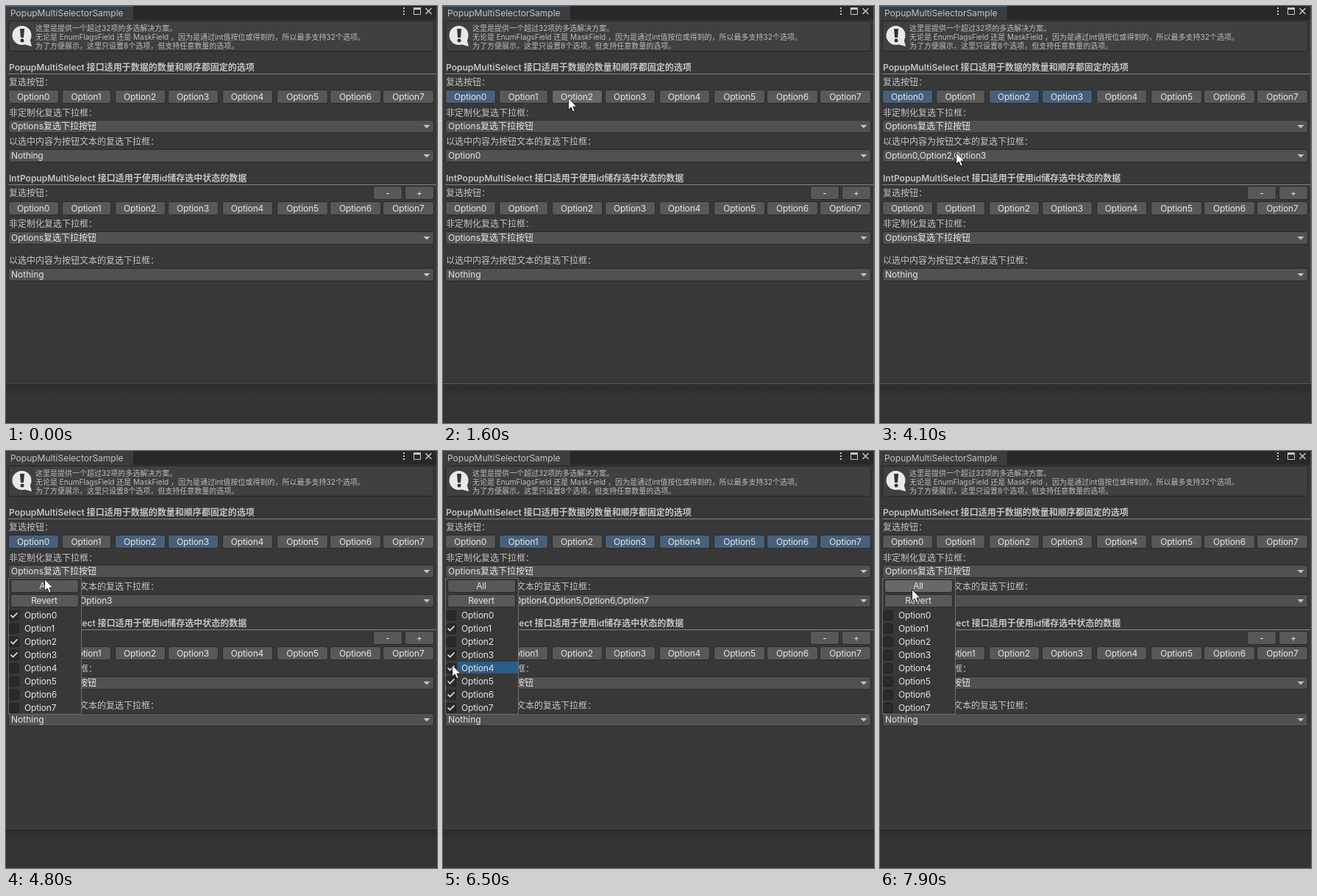
Write an HTML page that moves like this. It is 586x568 px and loops after 8 s.

```html
<!DOCTYPE html>
<html lang="zh-CN">
<head>
<meta charset="utf-8">
<title>PopupMultiSelectorSample</title>
<style>
html, body { margin: 0; width: 100%; height: 100%; overflow: hidden; background: #343434; }
svg { display: block; width: 586px; height: 568px; }
text { font: 12px Inter, "Noto Sans CJK SC", "Noto Sans CJK", sans-serif; fill: #c4c4c4; white-space: pre; }
.bold { font-weight: 600; }
.small { font-size: 10px; fill: #bdbdbd; }
.light { fill: #e6e6e6; }
.opt { fill: #e6e6e6; letter-spacing: -.15px; }
.mid { text-anchor: middle; }
</style>
</head>
<body>
<svg viewBox="0 0 586 568">
  <defs>
    <linearGradient id="shade" x2="0" y2="1">
      <stop offset="0" stop-color="#2c2c2c"/><stop offset="1" stop-color="#343434"/>
    </linearGradient>
  </defs>
  <g id="base"></g>
  <g id="live"></g>
</svg>
<script>
const LOOP = 8000, STEP = 100, FOCUS = 1000, OPEN = 4700, ALL = 255;

// Key points of the pointer: time, x, y
const PATH = [
  [100, 561, 47], [900, 33, 121], [1600, 170, 125], [2200, 261, 124], [2600, 217, 131],
  [3000, 33, 194], [3600, 137, 226], [4100, 103, 199], [4500, 53, 165], [4700, 53, 165],
  [5100, 47, 201], [5400, 47, 201], [5900, 14, 275], [6500, 12, 291], [6900, 12, 288], [7400, 43, 188]
];
// Each click acts on whatever lies under the pointer
const CLICKS = [1000, 1800, 2200, 5300, 6200, 6600, 6900, 7900];

const items = [...Array(8).keys()];
const colX = i => 3 + 72 * i + (i > 0) + 2 * (i > 3) + 2 * (i > 4);
const colW = i => 69 + (i > 4) - 2 * (i === 1);
const rowY = i => 224 + 18 * i;
const optionName = i => 'Option' + i;

const $ = id => document.getElementById(id);
const rect = (x, y, w, h, fill, more = '') => `<rect x="${x}" y="${y}" width="${w}" height="${h}" fill="${fill}" ${more}/>`;
const text = (x, cy, s, cls = '') => `<text x="${x}" y="${cy + 4.4}" class="${cls}">${s}</text>`;
const box = (x, y, w, h, fill, edge = '#2a2a2a', r = 3) =>
  rect(x + .5, y + .5, w - 1, h - 1, fill, `stroke="${edge}" rx="${r}"`);
const button = (x, y, w, s, fill = '#585858', h = 19) =>
  box(x, y, w, h, fill) + text(x + Math.floor(w / 2), y + h / 2, s, 'opt mid');
const dropdown = (cy, s) =>
  box(3, cy - 9, 579, 18, '#515151') + (s ? text(7, cy, s, 'light') : '') +
  `<path d="M567.5 ${cy - 2}h9l-4.5 4.5z" fill="#c4c4c4"/>`;

function drawBase() {
  const help = ['这里是提供一个超过32项的多选解决方案。',
    '无论是 EnumFlagsField 还是 MaskField ，因为是通过int值按位或得到的，所以最多支持32个选项。',
    '为了方便展示，这里只设置8个选项，但支持任意数量的选项。'];
  const section = (cy, title) => text(4, cy, title, 'bold') + rect(3, cy + 8, 582, 1, '#848484');
  const labels = y => text(4, y, '复选按钮：') + text(4, y + 41.5, '非定制化复选下拉框：');
  $('base').innerHTML =
    rect(0, 0, 586, 568, '#343434') + rect(0, 515, 586, 16, 'url(#shade)') +
    rect(0, 0, 586, 515, '#383838') + rect(0, 0, 586, 19, '#282828') +
    rect(0, 0, 173, 19, '#3c3c3c') + rect(173, 0, 1, 19, '#232323') +
    text(6, 10, 'PopupMultiSelectorSample') +
    [2, 6, 10].map(y => rect(540, y, 2, 2, '#c8c8c8')).join('') +
    '<path d="M554.5 3v8.5h9V3" fill="none" stroke="#c8c8c8"/>' + rect(554, 2, 10, 3, '#c8c8c8') +
    '<path d="M570.5 3l8 8m0-8l-8 8" stroke="#c8c8c8" stroke-width="1.5"/>' +
    box(3, 20, 579, 42, '#404040', '#252525') +
    '<g fill="#e9e9e9"><circle cx="21.5" cy="40" r="13"/><path d="M24 52l11 3-3-11z"/></g>' +
    '<g fill="#333"><path d="M19 31h6l-1 12h-4z"/><circle cx="22" cy="47" r="2.5"/></g>' +
    help.map((s, i) => text(40, 29.2 + i * 12.2, s, 'small')).join('') +
    section(84, 'PopupMultiSelect 接口适用于数据的数量和顺序都固定的选项') +
    section(235, 'IntPopupMultiSelect 接口适用于使用id储存选中状态的数据') +
    labels(104) + labels(255) +
    [185, 347].map(y => text(4, y, '以选中内容为按钮文本的复选下拉框：')).join('') +
    dropdown(164, 'Options复选下拉按钮') + dropdown(204) +
    dropdown(316, 'Options复选下拉按钮') + dropdown(366, 'Nothing') +
    button(499, 245, 40, '-') + button(542, 245, 40, '+') +
    items.map(i => button(colX(i), 266, colW(i), optionName(i))).join('');
}

function pointerAt(t) {
  if (t < PATH[0][0]) return null;
  const k = PATH.findIndex(p => p[0] > t);
  if (k < 0) return PATH[PATH.length - 1].slice(1);
  const [t0, ...a] = PATH[k - 1], [t1, ...b] = PATH[k];
  return a.map((v, j) => Math.round(v + (b[j] - v) * (t - t0) / (t1 - t0)));
}

// The control under the pointer: an option index, 'All' or 'Revert'
function hitAt(t) {
  if (t < FOCUS) return null;
  const [x, y] = pointerAt(t);
  if (t < OPEN) return y >= 114 && y < 133 ? items.find(i => x >= colX(i) && x < colX(i) + colW(i)) : null;
  if (y >= 175 && y < 193) return 'All';
  if (y >= 195 && y < 213) return 'Revert';
  return items.find(i => Math.abs(y - rowY(i)) < 9);
}

function maskAt(t) {
  return CLICKS.filter(c => c <= t).reduce((mask, c) => {
    const hit = hitAt(c);
    if (hit === 'All') return mask ? 0 : ALL;
    return mask ^ (hit === 'Revert' ? ALL : 1 << hit);
  }, 0);
}

function popup(mask, hit) {
  return rect(3.5, 173.5, 99, 185, '#383838', 'stroke="#6e6e6e"') +
    ['All', 'Revert'].map((s, i) =>
      button(6, 175 + i * 20, 93, s, hit === s ? '#686868' : '#585858', 18)).join('') +
    items.map(i => {
      const cy = rowY(i);
      return (hit === i ? rect(20, cy - 9, 82, 16, '#2c5d87') : '') +
        box(4, cy - 7, 14, 14, '#2a2a2a', '#202020', 2) + text(25, cy, optionName(i), 'opt') +
        (mask >> i & 1 ? `<path d="M6.5 ${cy - .5}l3 3 6-6" fill="none" stroke="#e4e4e4" stroke-width="1.7"/>` : '');
    }).join('');
}

function draw(t) {
  const mask = maskAt(t), hit = hitAt(t), p = pointerAt(t), open = t >= OPEN;
  const edge = t >= FOCUS && !open ? '#5a5a5a' : '#444';
  const chosen = items.filter(i => mask >> i & 1);
  const fill = i => {
    const hot = !open && hit === i;
    return mask >> i & 1 ? (hot ? '#4f6785' : '#46607c') : (hot ? '#676767' : '#585858');
  };
  $('live').innerHTML =
    rect(0, 514, 586, 1, edge) + rect(585, 0, 1, 515, edge) +
    (open ? '' : rect(0, 0, 173, 1, '#2c6cae')) +
    items.map(i => button(colX(i), 114, colW(i), optionName(i), fill(i))).join('') +
    text(7, 204, chosen.map(optionName).join(',') || 'Nothing', 'opt') +
    (open ? popup(mask, hit) : '') +
    (p ? `<path transform="translate(${p})" d="M.5.5v16l3.7-3.5 2.5 6 2.6-1.1-2.5-5.7h5z" fill="#fff" stroke="#111" stroke-width=".9"/>` : '');
}

let last = -1;
function tick(now) {
  const t = Math.floor(now % LOOP / STEP) * STEP;
  if (t !== last) draw(last = t);
  requestAnimationFrame(tick);
}
drawBase();
draw(0);
requestAnimationFrame(tick);
</script>
</body>
</html>
```
